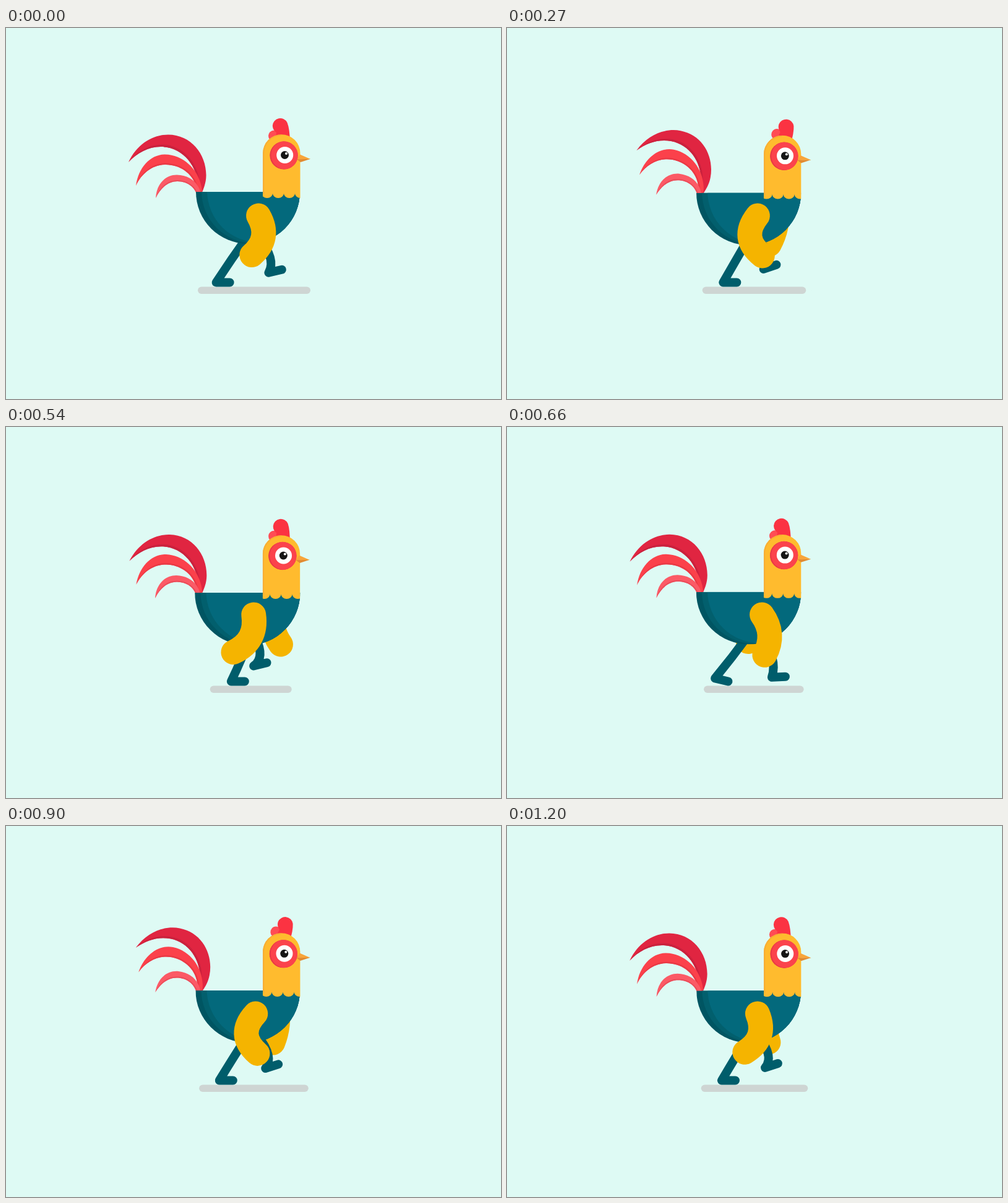
Write an HTML page that moves like this. It is 800 by 600 pixels and loops after 1.23 s.

```html
<!DOCTYPE html>
<html lang="en">
<head>
<meta charset="utf-8">
<title>Walking rooster</title>
<style>
  html, body { margin: 0; width: 100%; height: 100%; overflow: hidden; background: #defaf4; }
  svg { display: block; width: 100vw; height: 100vh; }
  .limb { fill: none; stroke-linecap: round; stroke-linejoin: round; }
  .leg { stroke: #005d6b; stroke-width: 14; }
  .wing { stroke: #f5b400; stroke-width: 40; }
</style>
</head>
<body>
<svg viewBox="0 0 800 600" xmlns="http://www.w3.org/2000/svg">
  <defs>
    <clipPath id="bowl"><path d="M-84 0H84A84 84 0 0 1-84 0Z"/></clipPath>
    <clipPath id="neck"><path d="M415 290V202.5A30.2 30.2 0 0 1 475.5 202.5V290Z"/></clipPath>
    <clipPath id="patch"><circle cx="449" cy="206" r="22.8"/></clipPath>
  </defs>
  <rect width="800" height="600" fill="#defaf4"/>
  <rect id="shadow" y="418.5" height="11.5" rx="5.75" fill="#ced5d3"/>

  <g id="tailBig">
    <path fill="#e02541" d="M198 217C212 187 238 172.5 262 172.5C299 172.5 323.5 204 323.5 238C323.5 250 320 258 316 268H309C316 232 290 192 250 192C230 192 212 202 198 217Z"/>
    <path fill="#cb213d" d="M198 217C213 198 232 188.5 252 188.5C290 189 318 226 313 268H309C316 232 290 192 250 192C230 192 212 202 198 217Z"/>
    <path fill="#fb414b" d="M210 255C214 226 233 204.5 257 204.5C290 205 317 235 317 268H309C308 240 285 221 258 221C237 221 219 235 210 255Z"/>
    <path fill="#ea3945" d="M210 255C219 232 237 218.5 258 218.5C288 219 310 239 312 268H309C308 240 285 221 258 221C237 221 219 235 210 255Z"/>
  </g>
  <g id="tailSmall">
    <path fill="#fb5a66" d="M242 275C243 253 257 237.5 276 237.5C297 238 311 250 315 268H308C303 255 291 248 277 248C261 248 249 260 242 275Z"/>
    <path fill="#ec4c59" d="M242 275C248 258 260 246 277 246C292 246 305 254 310.5 268H308C303 255 291 248 277 248C261 248 249 260 242 275Z"/>
  </g>

  <path id="farWing" class="limb wing"/>
  <path id="farLeg" class="limb leg"/>
  <path id="nearLeg" class="limb leg"/>

  <g id="body">
    <g clip-path="url(#bowl)">
      <rect x="-85" y="0" width="170" height="85" fill="#005562"/>
      <circle cx="9" cy="-1" r="84" fill="#025f6d"/>
      <circle cx="18" cy="-2" r="84" fill="#03697c"/>
    </g>
  </g>

  <g id="head">
    <g id="comb">
      <circle cx="433" cy="174.5" r="9" fill="#ff4c54"/>
      <path fill="#fb3342" d="M430.8 158A12.5 12.5 0 0 1 454.5 153Q458.5 163 459 184H435L437 169Q431 165 430.8 158Z"/>
    </g>
    <g clip-path="url(#neck)">
      <path id="hem" fill="#ffbb2e"/>
      <path fill="#f8ae35" d="M415 268V202.5A30.2 30.2 0 0 1 445 172V174A28 28 0 0 0 417.5 202.5V268Z"/>
    </g>
    <g id="beak">
      <path fill="#f8a53a" d="M470 212.5L475 204.5L492 212Z"/>
      <path fill="#e28a30" d="M470 212.3L492 211.8L476 217Z"/>
    </g>
    <g id="eye">
      <g clip-path="url(#patch)">
        <circle cx="449" cy="206" r="23" fill="#e93a44"/>
        <circle cx="451.5" cy="205.5" r="23" fill="#fb434c"/>
      </g>
      <g id="ball">
        <circle cx="450.7" cy="205.5" r="13.5" fill="#fff"/>
        <circle cx="450.5" cy="205.5" r="6.5" fill="#161616"/>
        <circle cx="453" cy="203" r="2" fill="#fff"/>
      </g>
    </g>
  </g>

  <path id="nearWing" class="limb wing"/>
</svg>

<script>
const FRAME = 30, COUNT = 41, CYCLE = COUNT / 2, GROUND = 411.5;
const $ = id => document.getElementById(id);
const set = (id, name, value) => $(id).setAttribute(name, value);
const move = (id, value) => set(id, 'transform', value);
const clamp = (v, lo, hi) => Math.max(lo, Math.min(hi, v));
// Cosine over one stride, highest at the given peak
const wave = (p, peak) => Math.cos(2 * Math.PI * (p - peak) / CYCLE);

function drawLeg(id, p) {
  // The foot leaves the ground at 11 and lands 12 units later
  const air = clamp(((p - 11 + 2 * CYCLE) % CYCLE) / 12, 0, 1);
  const early = clamp((p + CYCLE - 11) / 12, 0, 1);
  const w = p < 11 ? early : air;
  const lift = 26 * Math.sin(Math.PI * w);
  const x = 382 + 46 * wave(p, 1.3), y = GROUND - lift;

  const flat = Math.asin(Math.min(1, lift / 22));
  const tilt = Math.min(flat, 1.13 * (1 - w) * Math.sin(2 * Math.PI * w));
  const tx = x + 22 * Math.cos(tilt), ty = y + 22 * Math.sin(tilt);

  const hip = 400 + 0.2 * (x - 390);
  const knee = (hip + x) / 2 + 11 + 11 * wave(p, 0);
  set(id, 'd', `M${hip} 338Q${knee} 373 ${x} ${y}L${tx} ${ty}`);
}

function drawWing(id, p, o) {
  const sx = o.x + 10.5 * wave(p, o.peak - 1.1), sy = o.y;
  const ex = o.tipX + o.swing * wave(p, o.peak);
  const ey = o.tipY + 4 * wave(p, o.peak);
  // Bend sideways from the middle of the wing, ahead of the swing
  const bend = o.bend * wave(p, o.peak - 5.8) - 3;
  const kx = (sx + ex) / 2 + bend;
  const ky = (sy + ey) / 2 - bend * (ex - sx) / (ey - sy);
  set(id, 'd', `M${sx} ${sy}Q${kx} ${ky} ${ex} ${ey}`);
}

const near = { x: 404.5, y: 303.5, tipX: 397, tipY: 367, swing: 43, peak: 5.1, bend: 30 };
const far = { x: 433, y: 291, tipX: 425, tipY: 350, swing: 48, peak: 14.2, bend: 12 };

function draw(ms) {
  const f = Math.floor(ms / FRAME) % COUNT;
  const p = f % CYCLE;
  const dip = 4.2 * Math.abs(Math.sin(2 * Math.PI * p / CYCLE));
  const sway = (1 - wave(p, 0)) / 2;
  const reach = wave(p, 0) ** 2;

  set('shadow', 'x', 351 - 41 * reach);
  set('shadow', 'width', 78 + 104 * reach);

  move('tailBig', `translate(0 ${dip}) rotate(${11.2 * sway} 313 267)`);
  move('tailSmall', `translate(${-0.3 * dip} ${dip}) rotate(${5.6 * sway} 313 267)`);
  move('body', `translate(${391 - 0.25 * dip} ${265 + dip}) scale(${1 + 0.0045 * dip})`);

  move('head', `translate(${-0.1 * dip} ${dip})`);
  move('comb', `rotate(${19 * sway} 447 183)`);
  move('beak', `translate(${-0.35 * dip} 0)`);
  move('eye', `translate(${-0.65 * dip} ${-0.15 * dip})`);
  set('hem', 'd', `M${413 - 1.4 * dip} 160V267.5` + 'a9 7.5 0 0 0 18 0'.repeat(4) + 'V160Z');

  // One blink in every second stride
  const open = clamp((Math.abs(f - 12.5) - 1) / 2, 0, 1);
  move('ball', `translate(0 ${205.5 * (1 - open)}) scale(1 ${open})`);

  drawLeg('nearLeg', p);
  drawLeg('farLeg', (p + CYCLE / 2) % CYCLE);
  drawWing('nearWing', p, near);
  drawWing('farWing', p, far);
}

const start = performance.now();
function tick() {
  draw(performance.now() - start);
  requestAnimationFrame(tick);
}
tick();
</script>
</body>
</html>
```
